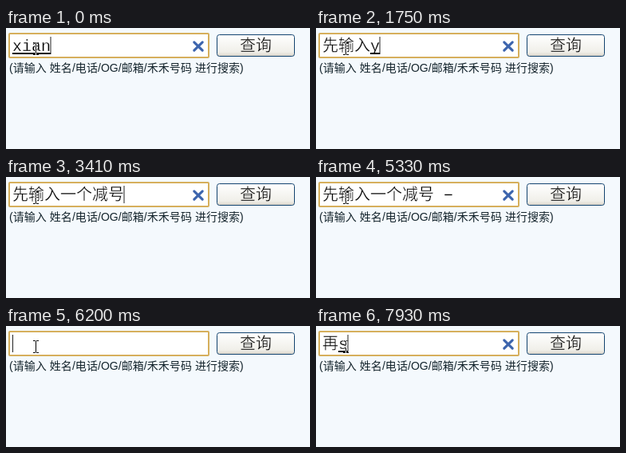
Animation of 381x152 px, one loop 8000 ms. Source, as an HTML page:

```html
<!DOCTYPE html>
<html lang="zh">
<head>
<meta charset="utf-8">
<title>搜索框</title>
<style>
  html, body { margin: 0; width: 100%; height: 100%; overflow: hidden; background: #f4f9fd; }
  svg { display: block; width: 381px; height: 152px; }
  text { white-space: pre; }
  /* a thin stroke in the backdrop colour slims the glyphs */
  .han { font: 300 20px "Noto Sans CJK SC", "Noto Sans CJK", sans-serif; stroke-width: .4px; }
  .mono { font: 20px "Liberation Mono", monospace; stroke-width: .3px; }
  .hint { font: 14px "Liberation Sans", "Noto Sans CJK SC", "Noto Sans CJK", sans-serif; letter-spacing: .05px; fill: #14242c; }
  #beam { mix-blend-mode: difference; }
</style>
</head>
<body>
<svg viewBox="0 0 381 152">
  <defs>
    <linearGradient id="face" x1="0" y1="0" x2="0" y2="1">
      <stop offset="0" stop-color="#fff"/>
      <stop offset=".8" stop-color="#f0efe9"/>
      <stop offset="1" stop-color="#d8d3c8"/>
    </linearGradient>
  </defs>
  <rect width="381" height="152" fill="#f4f9fd"/>

  <rect x="4" y="7" width="250" height="30" rx="1" fill="#fff" stroke="#d6af5c" stroke-width="2"/>

  <rect x="264.5" y="8.5" width="97" height="27" rx="3" fill="url(#face)" stroke="#12436f"/>
  <text class="han" x="293" y="29" stroke="#f6f5f1">查询</text>
  <text class="hint" x="4" y="55">(请输入 姓名/电话/OG/邮箱/禾禾号码 进行搜索)</text>

  <rect id="mark" x="8" y="11" height="22" fill="#316ac5"/>
  <text id="han" class="han" x="8" y="29"></text>
  <text id="latin" class="mono" y="29"></text>
  <rect id="line" y="31" height="2"/>
  <rect id="caret" y="11" width="1" height="22" fill="#222"/>
  <path id="clear" d="M235.8 17.8L246.2 28.2M246.2 17.8L235.8 28.2" stroke="#3c64ad" stroke-width="3.1" stroke-linecap="round"/>
  <path id="beam" d="M34 18.5h3m1 0h3M37.5 19v14M34 33.5h3m1 0h3" stroke="#fff" fill="none"/>
</svg>
<script>
const LOOP = 8000, LEFT = 8, HAN = 20, LATIN = 12;
const $ = id => document.getElementById(id);
const el = Object.fromEntries(
  ['mark', 'han', 'latin', 'line', 'caret', 'clear'].map(id => [id, $(id)]));

// time, committed characters, latin tail, mode
// modes: "type" composing, "on"/"off" caret state, "all" selected
const steps = [
  [0, '', 'xian', 'type'],
  [440, '先', '', 'on'],
  [810, '先', 's', 'type'],
  [900, '先', 'sh', 'type'],
  [1080, '先', 'shu', 'type'],
  [1200, '先', "shu'r", 'type'],
  [1290, '先', "shu'ru", 'type'],
  [1540, '先输入', '', 'on'],
  [1750, '先输入', 'y', 'type'],
  [1930, '先输入', 'yi', 'type'],
  [2020, '先输入', "yi'g", 'type'],
  [2110, '先输入一个', '', 'on'],
  [2320, '先输入一个', 'j', 'type'],
  [2400, '先输入一个', 'ji', 'type'],
  [2480, '先输入一个', 'jia', 'type'],
  [2560, '先输入一个', 'jian', 'type'],
  [2740, '先输入一个', "jian'h", 'type'],
  [2800, '先输入一个', "jian'ha", 'type'],
  [2920, '先输入一个', "jian'hao", 'type'],
  [3410, '先输入一个减号', '', 'on'],
  [3760, '先输入一个减号', ' ', 'on'],
  [4290, '先输入一个减号', ' ', 'off'],
  [4790, '先输入一个减号', ' ', 'on'],
  [4810, '先输入一个减号', ' −', 'on'],
  [5330, '先输入一个减号', ' −', 'off'],
  [5740, '先输入一个减号', ' −', 'all'],
  [6200, '', '', 'on'],
  [6730, '', '', 'off'],
  [6820, '', 'z', 'type'],
  [7040, '', 'za', 'type'],
  [7160, '', 'zai', 'type'],
  [7590, '再', '', 'on'],
  [7930, '再', 's', 'type']
];

const show = (node, on) => node.setAttribute('visibility', on ? 'visible' : 'hidden');
let shown;

function draw(time) {
  const step = steps.findLast(s => s[0] <= time);
  if (step === shown) return;
  shown = step;
  const [, han, latin, mode] = step;
  const tail = LEFT + han.length * HAN;
  const end = tail + latin.length * LATIN;
  const [ink, back] = mode === 'all' ? ['#fff', '#316ac5'] : ['#000', '#fff'];

  el.han.textContent = han;
  el.latin.textContent = latin;
  el.latin.setAttribute('x', tail);
  for (const node of [el.han, el.latin]) {
    node.setAttribute('fill', ink);
    node.setAttribute('stroke', back);
  }
  el.line.setAttribute('x', tail);
  el.line.setAttribute('width', end - tail);
  el.mark.setAttribute('width', end - LEFT);
  el.caret.setAttribute('x', Math.max(LEFT, end - 0.5));
  show(el.line, mode === 'type');
  show(el.mark, mode === 'all');
  show(el.caret, mode === 'type' || mode === 'on');
  show(el.clear, han + latin);
}

const start = performance.now();
function tick() {
  draw((performance.now() - start) % LOOP);
  requestAnimationFrame(tick);
}
tick();
</script>
</body>
</html>
```
